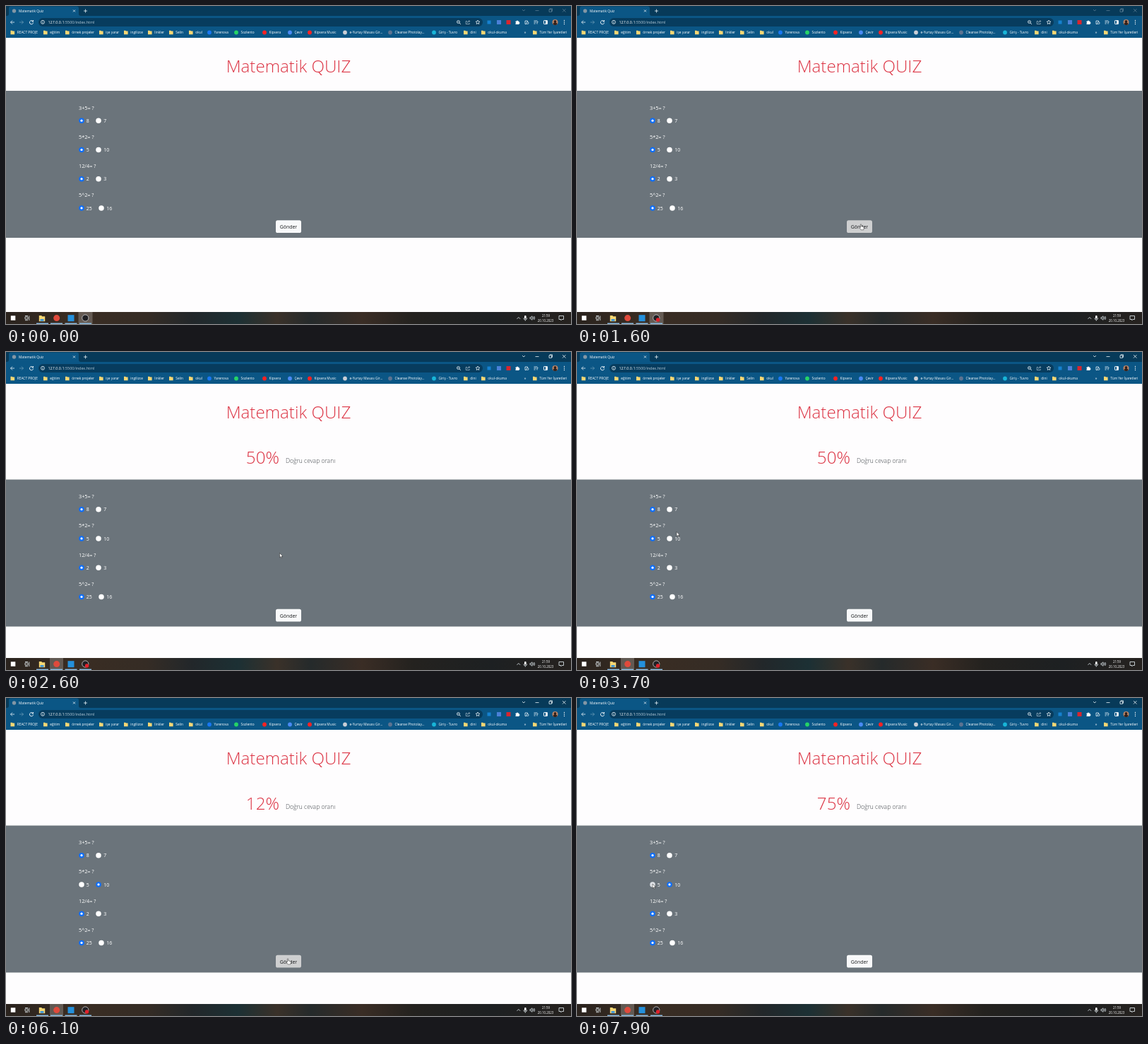
Recreate the animation shown at these times as an HTML page. Size 800x450 px, loop 8000 ms.

```html
<!DOCTYPE html>
<html lang="tr">
<head>
<meta charset="utf-8">
<title>Matematik Quiz</title>
<style>
  html, body { margin: 0; width: 100%; height: 100%; overflow: hidden; background: #fff; }
  svg { display: block; width: 800px; height: 450px; }
  text { font-family: "Open Sans", "Noto Sans", sans-serif; white-space: pre; }
  .ui { font-size: 4.8px; fill: #fff; }
  .page { font-size: 7.3px; fill: #fff; }
  .big { font-size: 24.2px; font-weight: 300; fill: #dc3545; }
  .line { fill: none; stroke: #e8f1f7; stroke-width: .8; }
</style>
</head>
<body>
<svg id="stage" viewBox="0 0 800 450" xmlns="http://www.w3.org/2000/svg"></svg>
<script>
const LOOP = 8000;
const CLICK = 1650, PICK = 5180, RECLICK = 5943, PRESS = 7840;
const SHIFT = 60.5;

const text = (x, y, s, cls = 'ui', extra = '') =>
  `<text x="${x}" y="${y}" class="${cls}" ${extra}>${s}</text>`;
const rect = (x, y, w, h, fill, extra = '') =>
  `<rect x="${x}" y="${y}" width="${w}" height="${h}" fill="${fill}" ${extra}/>`;
const dot = (x, y, r, fill, extra = '') =>
  `<circle cx="${x}" cy="${y}" r="${r}" fill="${fill}" ${extra}/>`;
const line = (d, extra = '') => `<path class="line" d="${d}" ${extra}/>`;
const folder = (x, y, k = 1) =>
  `<path transform="translate(${x} ${y}) scale(${k})" fill="#f7d774" d="M0 0h2.2l.8.8h2.6v4.7h-5.6z"/>`;

const folders = [
  [6.5, 'REACT PROJE'], [53, 'eğitim'], [84, 'örnek projeler'], [132, 'işe yarar'],
  [167, 'ingilizce'], [201, 'linkler'], [231, 'Selin'], [259, 'okul'],
  [648, 'dini'], [673, 'okul-okuma'], [746, 'Tüm Yer İşaretleri']
];
const sites = [
  [288, '#1877f2', 'Yarenova'], [326, '#25d366', 'Sozlento'], [366, '#f22', 'Kipsera'],
  [402, '#4a8af4', 'Çevir'], [430, '#f22', 'Kipsera Music'], [480, '#c9ced6', 'e-Yurtay Masası Gir...'],
  [544, '#5d7391', 'Cleanse Photolay...'], [606, '#18b5d8', 'Giriş - Tuvro']
];

function browser() {
  return rect(0, 0, 800, 45, '#0b5685') + rect(0, 0, 800, 14, '#073a59') +
    '<path fill="#0b5685" d="M1 14q3 0 3-3V3.500q0-3 3-3h93q3 0 3 3V11q0 3 3 3z"/>' +
    dot(11.500, 7, 2.7, '#8296a5') + text(18, 8.800, 'Matematik Quiz') +
    line('M95 5.400l3 3m0-3l-3 3M110 7h5M112.500 4.500v5') +
    `<g id="winctl">${line('M731 5l2 2 2-2M749.500 6.500h5M769 4.800h3.500v3.500h-3.500zM770 4.800v-1h3.500v3.500h-1M788 4l4.500 4.500m0-4.500l-4.500 4.500', 'stroke-width=".7"')}</g>` +
    line('M12 23H6.500m2.500-2.500L6.500 23 9 25.500') +
    line('M19 23h5.500m-2.500-2.500l2.500 2.500-2.500 2.500', 'opacity=".4"') +
    line('M38 21.500a2.600 2.600 0 1 0 .6 2M38.500 20v2h-2', 'style="stroke-width:1"') +
    rect(46, 17, 629, 12, '#073c5e', 'rx="6"') +
    line('M52 22.500v2M52 20.900v.7M49.500 22.800a2.500 2.500 0 1 0 5 0a2.500 2.500 0 1 0-5 0') +
    text(59.500, 25, '127.0.0.1<tspan fill="#b5cbd9">:5500/index.html</tspan>', 'ui', 'style="font-size:5.45px"') +
    line('M638.500 22.500a2 2 0 1 0 4 0a2 2 0 1 0-4 0M642 24l2 2M639.700 22.500h1.600') +
    line('M653 21.500h-1.800v4h5V24M653 24q0-2.500 3.500-2.500m-1.300-1.500l1.500 1.500-1.500 1.500', 'opacity=".65"') +
    line('M668 20l.9 1.900 2 .2-1.500 1.400.4 2-1.800-1-1.800 1 .4-2-1.500-1.400 2-.2z') +
    rect(681.500, 20.500, 5, 5, '#1681d0') + rect(695, 20, 6, 6, '#4a80d8') +
    rect(708.500, 20, 6, 6, '#d8262f') +
    '<path fill="#fff" d="M721.500 21.500h1.500a1 1 0 0 1 2 0h1.500v1.500a1 1 0 0 1 0 2v1h-5v-1.500a.8.8 0 0 0 0-1.500z"/>' +
    line('M735 21h3.500v1.500M735 21v4.500h2M737 24a1.500 1.500 0 1 0 3 0a1.500 1.500 0 1 0-3 0') +
    line('M747.500 21h5M747.500 23h3M747.500 25h2M752 25.500v-3h1.500') +
    rect(761.500, 20.500, 5, 5, 'none', 'stroke="#fff" stroke-width=".9" rx=".6"') + rect(764, 20.500, 2.500, 5, '#fff') +
    dot(777.500, 23, 4, '#b98468') +
    '<path fill="#30211d" d="M774.500 25.700q0-2 2-2.300a1.800 1.800 0 1 1 2 0q2 .3 2 2.300a4 4 0 0 1-6 0z"/>' +
    [20.500, 23, 25.500].map(y => dot(790.500, y, .65, '#fff')).join('') +
    folders.map(([x, s]) => folder(x, 34.800) + text(x + 9.300, 39.400, s)).join('') +
    sites.map(([x, c, s]) => dot(x, 37.500, 2.900, c) + text(x + 6.500, 39.400, s)).join('') +
    text(733.500, 39.200, '»', 'ui', 'style="font-size:6px"');
}

// Question, then two answers; wide labels push the second radio right.
const quiz = [
  ['3+5= ?', '8', '7', 131], ['5*2= ?', '5', '10', 131],
  ['12/4= ?', '2', '3', 131], ['5^2= ?', '25', '16', 135]
];

function radio(x, y, on, id) {
  return `<g id="${id}">${dot(x, y, 3.75, '#fff', 'class="face"')}` +
    `${dot(x, y, 1.6, '#fff', 'class="pip"')}</g>`;
}

function quizRow([q, a, b, x2], i) {
  const y = 162.200 + i * 41.250;
  return text(103, y - 15.700, q, 'page') +
    radio(107, y, true, `r${i}0`) + text(113.800, y + 2.700, a, 'page', 'style="font-size:7px"') +
    radio(x2, y, false, `r${i}1`) + text(x2 + 7.300, y + 2.700, b, 'page', 'style="font-size:7px"');
}

function page() {
  return text(400, 93.500, 'Matematik QUIZ', 'big', 'text-anchor="middle"') +
    `<g id="result">${text(0, 157.500, '', 'big', 'id="pct" text-anchor="end"')}` +
    `${text(0, 157.200, 'Doğru cevap oranı', '', 'id="label" style="font-size:8.55px;font-weight:300" fill="#3c4146"')}</g>` +
    `<g id="form">${rect(0, 120, 800, 208, '#6b747b')}${quiz.map(quizRow).join('')}` +
    rect(382, 303.300, 36, 17.700, '#f8f9fa', 'rx="2.6" id="btn"') +
    text(400, 315, 'Gönder', 'page', 'text-anchor="middle" style="font-size:6.9px;fill:#16181a"') + '</g>';
}

function taskbar() {
  const tones = [[0, '#2a231e'], [12, '#3a2d23'], [25, '#352c25'], [33, '#22272a'], [41, '#1c3034'],
    [48, '#3a3129'], [54, '#252a2b'], [63, '#3a2d25'], [72, '#24221f'], [86, '#1d2022'], [100, '#26221f']];
  const underline = (x, w = 17) => rect(x, 448.600, w, 1.4, '#8cbfe6');
  return '<defs><linearGradient id="wall">' +
    tones.map(([o, c]) => `<stop offset="${o}%" stop-color="${c}"/>`).join('') + '</linearGradient></defs>' +
    rect(0, 433, 800, 17, 'url(#wall)') +
    rect(62, 433, 19, 17, '#fff', 'id="hiA" opacity=".22"') +
    rect(102.500, 433, 20, 17, '#fff', 'id="hiB" opacity=".22"') +
    rect(6.800, 438.300, 6.500, 6.500, '#fff') +
    line('M27 438.500h4M27 440h4v3h-4zM27 444.700h4M32.800 438.500v6.500') +
    folder(46.800, 438, 1.5) + rect(48.500, 443, 5, 2.800, '#3c96dc') +
    dot(71.700, 441.600, 4.500, '#e04a3c') + rect(87.500, 437.200, 9, 9, '#2490dc') +
    dot(112.300, 441.500, 4.600, '#202024', 'stroke="#d5d5d8" stroke-width=".8"') +
    dot(114.500, 444, 2.700, '#e3202b', 'id="rec"') +
    underline(43) + underline(63) + underline(83.500) + underline(104) +
    line('M723.500 442.800l2.300-2.300 2.300 2.300') +
    rect(734, 438, 2.600, 4.500, '#fff', 'rx="1.2"') + line('M733 441.500q0 2.500 2.300 2.500t2.300-2.500M735.300 444v1.500') +
    line('M742 440.500h1.200l1.800-1.700v5.500l-1.800-1.700H742zM746.500 440q1 1.500 0 3M747.700 439q1.800 2.500 0 5') +
    text(764.500, 439.500, '21:59', 'ui', 'text-anchor="middle" style="font-size:4.4px"') +
    text(764, 447.300, '20.10.2023', 'ui', 'text-anchor="middle" style="font-size:4.4px"') +
    line('M783 438.500h6.500v5h-2.500l-1.200 1.300v-1.300h-2.800z');
}

const pointer = '<g id="cursor" stroke="#111" stroke-width=".45" stroke-linejoin="round" fill="#fff">' +
  '<path id="arrow" d="M0 0v6.200l1.400-1.200 1 2.200 1-.5-1-2.100h2z"/>' +
  '<path id="hand" d="M-.7.600q.7-1 1.400 0v2.700l2.900.7q.9.3.7 1.400l-.5 3h-3.700l-2.300-3.200q.2-1 1.500 0z"/></g>';

document.getElementById('stage').innerHTML =
  rect(0, 0, 800, 450, '#fefdfe') + page() + browser() + taskbar() + pointer;

const $ = id => document.getElementById(id);
const set = (id, name, value) => $(id).setAttribute(name, value);
const show = (id, on) => set(id, 'visibility', on ? 'visible' : 'hidden');
const clamp = v => Math.max(0, Math.min(1, v));
const ramp = (t, a, b) => clamp((t - a) / (b - a));

// Mouse path: time, x, y of the pointer's tip.
const path = [
  [1000, -8, 328], [1430, 392, 314], [1550, 402, 308.5], [1800, 402, 307.5], [2400, 388, 296],
  [2500, 388, 296], [2600, 387.5, 284.5], [3200, 122, 228], [3400, 106, 223.5], [3700, 141, 254.5],
  [4200, 141, 254.5], [4600, 137, 262], [5000, 133, 269.5], [5120, 131, 264], [5300, 131, 264],
  [5780, 397, 370], [5900, 399, 368.5], [7150, 399, 368.5], [7700, 114, 268], [7820, 107, 263], [8000, 107, 263]
];

function mouseAt(t) {
  const i = path.findIndex(p => p[0] > t);
  if (i < 1) return path[0].slice(1);
  const [t0, x0, y0] = path[i - 1], [t1, x1, y1] = path[i];
  const u = ramp(t, t0, t1), e = u * u * (3 - 2 * u);
  return [x0 + (x1 - x0) * e, y0 + (y1 - y0) * e];
}

function setRadio(id, on, pressed) {
  const face = $(id).querySelector('.face');
  face.setAttribute('fill', on ? '#0d6efd' : pressed ? '#dfe2e6' : '#fff');
  $(id).querySelector('.pip').setAttribute('visibility', on ? 'visible' : 'hidden');
}

function draw(t) {
  const sent = t >= CLICK, second = t >= PICK;
  const dy = sent ? SHIFT : 0;
  set('form', 'transform', `translate(0 ${dy})`);
  show('result', sent);

  const pct = t < RECLICK
    ? Math.min(50, Math.max(0, Math.floor((t - 1705) * .0788)))
    : Math.min(75, Math.floor((t - RECLICK) * .0788));
  const labelX = pct < 10 ? 389.3 : 396;
  $('pct').textContent = pct + '%';
  set('pct', 'x', labelX - 9);
  set('label', 'x', labelX);

  quiz.forEach((_, i) => {
    const other = i === 1 && second;
    setRadio(`r${i}0`, !other, i === 1 && t >= PRESS);
    setRadio(`r${i}1`, other, i === 1 && t >= PICK - 60 && !second);
  });

  const hover = ramp(t, 1380, 1530) - ramp(t, 1680, 1830) + ramp(t, 5760, 5910) - ramp(t, 7190, 7340);
  const mix = (a, b) => Math.round(a + (b - a) * hover);
  set('btn', 'fill', `rgb(${mix(248, 206)},${mix(249, 207)},${mix(250, 208)})`);

  set('winctl', 'opacity', sent ? 1 : .35);
  show('rec', t >= 600);
  const swap = ramp(t, 1600, 1800);
  [['hiA', swap], ['hiB', 1 - swap]].forEach(([id, k]) => {
    set(id, 'y', 450 - 17 * k);
    set(id, 'height', 17 * k);
  });

  const [x, y] = mouseAt(t);
  const over = x > 382 && x < 418 && y > 303.3 + dy && y < 321 + dy;
  set('cursor', 'transform', `translate(${x.toFixed(2)} ${y.toFixed(2)})`);
  set('arrow', 'display', t < 1000 || over ? 'none' : 'inline');
  set('hand', 'display', over && t >= 1000 ? 'inline' : 'none');
}

const start = performance.now();
function tick() {
  draw((performance.now() - start) % LOOP);
  requestAnimationFrame(tick);
}
tick();
</script>
</body>
</html>
```
